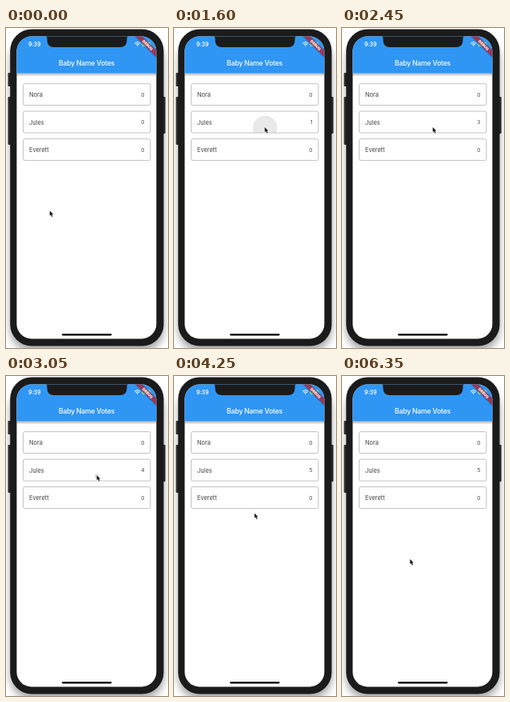
An HTML page for the animation above (6450 ms loop, 203x400 px).

```html
<!DOCTYPE html>
<html lang="en">
<head>
<meta charset="utf-8">
<title>Baby Name Votes</title>
<style>
html, body { margin: 0; width: 100%; height: 100%; overflow: hidden; background: #fff; }
svg { display: block; width: 100vw; height: 100vh; }
text { font-family: Inter, Roboto, sans-serif; }
</style>
</head>
<body>
<svg viewBox="0 0 203 400">
  <defs>
    <clipPath id="screen"><rect x="13.4" y="10.5" width="175" height="378" rx="18.5"/></clipPath>
    <clipPath id="card"><rect x="21.5" y="104" width="159.5" height="27" rx="2"/></clipPath>
    <filter id="soft" x="-20%" y="-20%" width="140%" height="140%"><feGaussianBlur stdDeviation="5"/></filter>
    <linearGradient id="shade" x2="0" y2="1">
      <stop stop-color="#000" stop-opacity=".3"/>
      <stop offset="1" stop-color="#000" stop-opacity="0"/>
    </linearGradient>
  </defs>

  <rect x="5" y="14" width="193" height="390" rx="27" opacity=".34" filter="url(#soft)"/>
  <g fill="#2a2a2a">
    <rect x="2.5" y="56" width="4" height="17" rx="1"/>
    <rect x="2.5" y="86" width="4" height="60" rx="1"/>
    <rect x="196" y="86" width="3.7" height="46" rx="1"/>
  </g>
  <rect x="5.2" y="1.5" width="192.4" height="396" rx="27" fill="#1b1b1b"/>

  <g clip-path="url(#screen)">
    <rect x="13" y="10" width="176" height="379" fill="#fefefe"/>
    <rect x="13" y="56.6" width="176" height="4" fill="url(#shade)"/>
    <rect x="13" y="10" width="176" height="46.6" fill="#2f96f3"/>
    <text x="101" y="46.9" font-size="8.7" letter-spacing="-.22" font-weight="500" fill="#fff" text-anchor="middle">Baby Name Votes</text>
    <text x="28" y="23.2" font-size="6.9" font-weight="600" fill="#fff">9:39</text>
    <g fill="none" stroke="#fff" stroke-width="1.1">
      <path d="M161.3 19.3q3.4-3 6.8 0M162.7 20.9q2-1.8 4 0"/>
      <path d="M164.7 22.9l-1-1.1h2z" fill="#fff" stroke="none"/>
      <rect x="170.8" y="17.8" width="10" height="4.8" rx="1.2" fill="#55cf78" stroke-width=".4"/>
    </g>
    <g transform="translate(188.7 10.2) rotate(45)">
      <rect x="-20" y="12.3" width="40" height="7.4" fill="#000" opacity=".2"/>
      <rect x="-20" y="13.1" width="40" height="5.6" fill="#a8304a" opacity=".9"/>
      <text y="17.6" font-size="4.7" font-weight="900" fill="#fff" text-anchor="middle">DEBUG</text>
    </g>
    <path d="M48 9.5q3.5 0 3.5 4v1.5q0 9 9 9h82q9 0 9-9v-1.5q0-4 3.5-4z" fill="#1b1b1b"/>
    <circle id="ripple" cx="114" cy="125" clip-path="url(#card)"/>
    <g id="cards"></g>
    <rect x="70" y="382.2" width="62.5" height="2.3" rx="1.15"/>
  </g>
  <path id="cursor" d="M0 0V6.1L1.4 4.9 2.6 7.5 3.8 6.9 2.7 4.5H4.5z" fill="#1a1a1a" stroke="#fff" stroke-width=".7" paint-order="stroke"/>
</svg>
<script>
const $ = id => document.getElementById(id);
const LOOP = 6450, STEP = 50;
const votes = [1500, 1850, 2450, 2850, 3400];
const ripples = [[1500, 1700], [2075, 2300], [2580, 2750], [3000, 3200]];
// start, end, from x y, to x y
const moves = [
  [50, 650, 54.8, 228.5, 116.5, 118.5],
  [1050, 1150, 116.5, 118.5, 113.7, 124],
  [3950, 4600, 113.7, 124, 85.2, 229]
];

$('cards').innerHTML = ['Nora', 'Jules', 'Everett'].map((name, i) => {
  const y = 69.6 + i * 34.5;
  return `<rect x="21.5" y="${y}" width="159.4" height="27" rx="2" fill="none" stroke="#b4b4b4" stroke-width=".8"/>
    <text x="29" y="${y + 16.4}" font-size="7.4" fill="#424242">${name}</text>
    <text class="count" x="173.4" y="${y + 16.1}" font-size="6.6" fill="#424242" text-anchor="end">0</text>`;
}).join('');
const count = document.querySelectorAll('.count')[1];

function pointer(t) {
  const [a, b, x, y, x2, y2] = moves.findLast(m => t >= m[0]) || moves[0];
  const p = Math.min(1, Math.max(0, (t - a) / (b - a)));
  const e = (p + p * p * (3 - 2 * p)) / 2;
  return [x + (x2 - x) * e, y + (y2 - y) * e];
}

function draw(now) {
  const t = Math.floor(now % LOOP / STEP) * STEP;
  count.textContent = votes.filter(v => t >= v).length;
  $('cursor').setAttribute('transform', `translate(${pointer(t)})`);
  const tap = ripples.find(([a, b]) => t >= a && t < b);
  const age = tap ? t - tap[0] : 0;
  $('ripple').setAttribute('r', 39 * (age / 150) ** 2.3);
  $('ripple').setAttribute('opacity', 0.125 * (1 - age / 300));
}

const start = performance.now();
function tick() {
  draw(performance.now() - start);
  requestAnimationFrame(tick);
}
tick();
</script>
</body>
</html>
```
